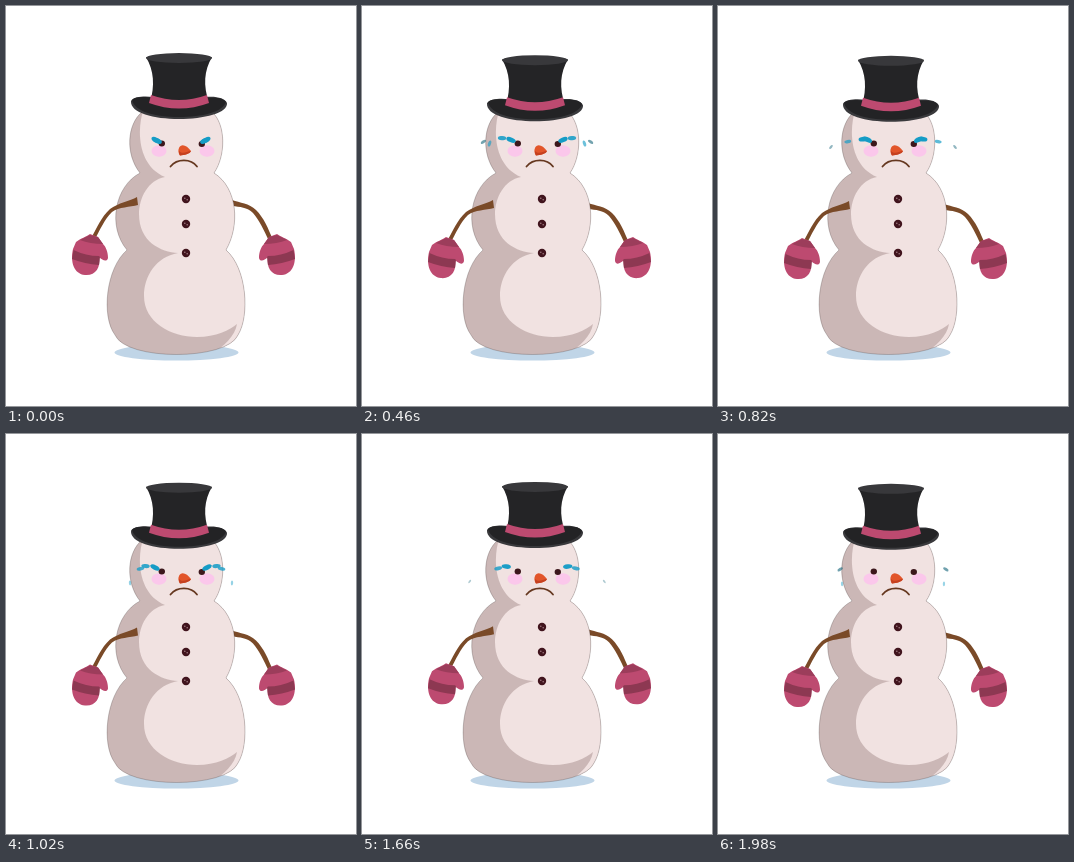
Animation, 350 px wide and 400 px high, one loop 2000 ms. Source, as an HTML page with a canvas:

```html
<!DOCTYPE html>
<html lang="en">
<head>
<meta charset="utf-8">
<title>Crying snowman</title>
<style>
html, body { margin: 0; width: 100%; height: 100%; overflow: hidden; background: #fff; }
canvas { display: block; }
</style>
</head>
<body>
<canvas id="stage" width="350" height="400"></canvas>
<script>
const ctx = document.getElementById('stage').getContext('2d');
const LOOP = 2000, STEP = 20, SWAY = 1400, FLIGHT = 850;

const path = d => new Path2D(d);
const body = path(`M136 106 C121 118 119 148 134 167 C109 180 101 220 121 244
  C100 262 95 310 109 329 C120 355 221 355 232 329 C244 310 241 262 220 244
  C234 220 232 182 208 167 C220 150 220 118 206 106 C190 92 152 92 136 106Z`);
const light = path(`M138 102 C130 124 132 160 159 171 C142 174 133 192 133 208
  C133 236 155 246 172 247 C150 251 138 270 138 290 C138 316 165 331 191 331
  C210 331 224 324 231 318 C229 330 218 340 205 349 L260 349 L260 90Z`);
const nose = path('M173 142 C175 137 181 139 185 145 C184 148 178 149 174 149.5 C172 147 172 144 173 142Z');
const noseShade = path('M173 145 C177 149 181 145 185 145 C184 148 178 149 174 149.5 C173 148 173 147 173 145Z');
const mouth = path('M164.5 160.5 C171 152.3 185 152.3 191 160.5');
const brim = path(`M125 95 C128 90 140 90 147 91 L200 91 C210 90 219 92 221 97
  C222 107 198 113 173 113 C148 113 124 107 125 95Z`);
const brimTop = path(`M126 94 C130 90 140 91 147 92 L200 92 C210 91 218 92 220 96
  C217 106 196 111 173 111 C150 111 129 106 126 94Z`);
const crown = path('M140 51 C148 65 149 79 144 97 Q173 108 203 97 C197 79 198 65 206 51Z');
const band = path('M145 89 Q173 99 201 89 L203 97 Q173 108 143 97Z');
const mitten = path(`M70 236 C75 232 80 231 84 228 L92 231 L97 238
  C100 241 102 246 102 252 C101 256 97 255 93 251 C95 262 89 270 79 269
  C68 268 64 256 67 243Z`);
const stripe = path('M67.5 244 Q80 250 93 250 L94 251 L93 259 Q79 258 66 253Z');
const cuff = path('M74 234 L84 229 L92 231 L97 238 Q84 238 74 234Z');
const leftArm = path(`M131 191 C124 195 112 197 104 203 C95 211 91 222 84 234
  L88 235 C94 224 98 214 106 206 C113 201 124 201 132 199Z`);
const rightArm = path(`M226 194 C234 197 243 197 250 204 C258 212 262 222 267 234
  L263 235 C258 224 253 214 247 207 C241 201 234 201 226 200Z`);

// Tear routes on the left side, evenly spaced in time
const far = [[154, 136], [148, 133], [139, 132], [126, 133], [113, 141], [104, 152]];
const near = [[154, 136], [147, 133], [138, 134], [128, 136], [124, 149], [125, 165]];
const tears = [
  ...[-110, 140, 690, 880, 1420].map(born => ({ born, route: far })),
  ...[-70, 340, 620, 1290].map(born => ({ born, route: near }))
];

function fill(shape, color) {
  ctx.fillStyle = color;
  ctx.fill(shape);
}

function oval(x, y, rx, ry, color, turn = 0) {
  ctx.fillStyle = color;
  ctx.beginPath();
  ctx.ellipse(x, y, rx, ry, turn, 0, Math.PI * 2);
  ctx.fill();
}

function shifted(dy, draw) {
  ctx.save();
  ctx.translate(0, dy);
  draw();
  ctx.restore();
}

function mirrored(sum, draw) {
  ctx.save();
  ctx.translate(sum, 0);
  ctx.scale(-1, 1);
  draw();
  ctx.restore();
}

function glove() {
  fill(mitten, '#bd4a70');
  fill(stripe, '#8d3852');
  fill(cuff, '#9c3d5b');
}

function drawBody() {
  fill(body, '#cbb7b6');
  ctx.save();
  ctx.clip(body);
  fill(light, '#f1e2e1');
  ctx.restore();
  ctx.lineWidth = 0.6;
  ctx.strokeStyle = 'rgba(50,40,40,.4)';
  ctx.stroke(body);
  for (const y of [193, 218, 247]) {
    oval(180, y, 4.2, 4.2, '#41141d');
    oval(178.8, y - 0.8, 0.8, 0.8, '#a07a80');
    oval(181.2, y + 0.8, 0.8, 0.8, '#a07a80');
  }
}

function drawFace() {
  oval(153, 145, 7.5, 5.8, '#fbc7eb');
  oval(201, 145, 7.5, 5.8, '#fbc7eb');
  oval(155.8, 137.5, 3.2, 2.9, '#3c171c');
  oval(195.8, 138, 3.2, 2.9, '#3c171c');
  fill(nose, '#e2552a');
  fill(noseShade, '#c5401f');
  ctx.lineWidth = 1.8;
  ctx.lineCap = 'round';
  ctx.strokeStyle = '#65371f';
  ctx.stroke(mouth);
}

function drawHat() {
  fill(brim, '#39393c');
  fill(brimTop, '#232325');
  fill(crown, '#242426');
  fill(band, '#bd4a70');
  oval(173, 52, 33, 5, '#38383b');
}

function drawTear(route, u) {
  const i = Math.min(4, Math.floor(u * 5)), k = u * 5 - i;
  const [ax, ay] = route[i], [bx, by] = route[i + 1];
  const x = ax + (bx - ax) * k, y = ay + (by - ay) * k;
  const size = u < 0.2 ? 1 : 1 - (u - 0.2) * 0.85;
  ctx.globalAlpha = Math.min(1, 1.25 - u);
  oval(x, y, 5 * size, 2.4 * size, x < 124 ? '#0d6076' : '#159cc6', Math.atan2(by - ay, bx - ax));
  ctx.globalAlpha = 1;
}

function drawTears(t) {
  for (const { born, route } of tears) {
    const u = (t - born) / FLIGHT;
    if (u < 0 || u >= 1) continue;
    drawTear(route, u);
    mirrored(350, () => drawTear(route, u));
  }
}

function render(t) {
  const sway = (1 - Math.cos(t / SWAY * Math.PI * 2)) / 2;
  ctx.fillStyle = '#fff';
  ctx.fillRect(0, 0, 350, 400);
  oval(170.5, 346.5, 62, 8, '#c0d5e7');
  shifted(sway * 4.2, () => fill(rightArm, '#7a4a28'));
  drawBody();
  shifted(sway * 4.2, () => {
    fill(leftArm, '#7a4a28');
    glove();
    mirrored(355, glove);
  });
  drawFace();
  shifted(sway * 3, drawHat);
  drawTears(t);
}

const start = performance.now();
function tick(now) {
  const t = Math.max(0, now - start) % LOOP;
  render(Math.floor(t / STEP) * STEP);
  requestAnimationFrame(tick);
}
render(0);
requestAnimationFrame(tick);
</script>
</body>
</html>
```
